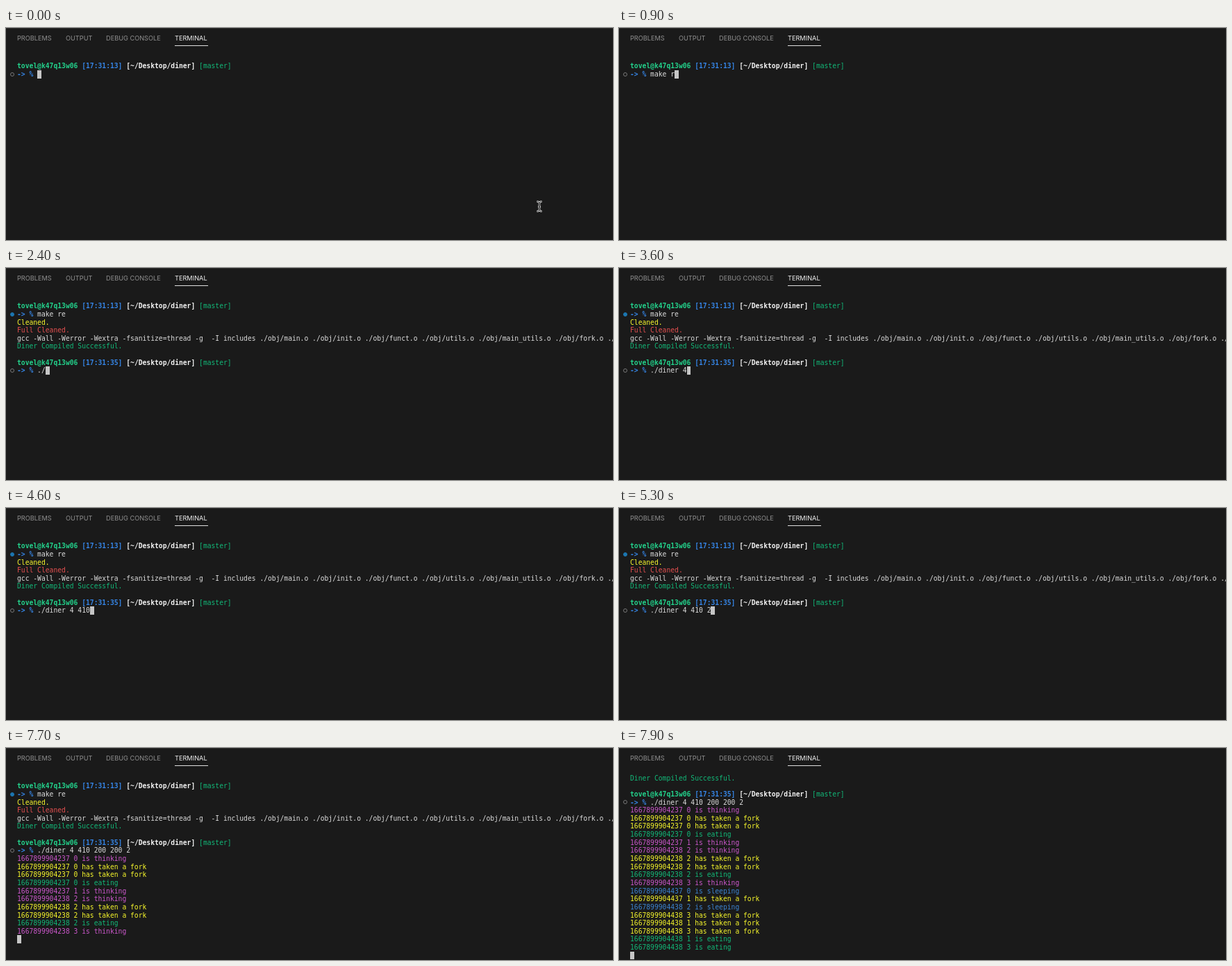
Recreate the animation shown at these times as an HTML page. Size 874 px wide and 306 px high, loop 8000 ms.

```html
<!DOCTYPE html>
<html lang="en">
<meta charset="utf-8">
<title>Terminal session</title>
<style>
  html, body { margin: 0; width: 100%; height: 100%; overflow: hidden; background: #1a1a1a; }
  body { position: relative; box-sizing: border-box; border-top: 1px solid #2b2b2b; }
  nav span { position: absolute; top: 8px; font: 9.2px/12px Inter, sans-serif; color: #8f8f8f; white-space: pre; }
  nav .active { color: #f0f0f0; }
  nav .active::after { content: ""; position: absolute; left: 0; top: 16px; width: 48px; height: 1px; background: #e0e0e0; }
  #screen { position: absolute; left: 0; top: 36.65px; width: 100%;
    font: 9.69px/11.65px "DejaVu Sans Mono", monospace; color: #dcdcdc; }
  #screen div { position: relative; height: 11.65px; padding-left: 16px; white-space: pre; }
  .mark::before { content: ""; position: absolute; left: 5.5px; top: 2.8px; width: 6px; height: 6px;
    box-sizing: border-box; border: 1px solid #777; border-radius: 50%; }
  .done::before { border-color: #1c76b0; background: #1c76b0; }
  .cursor { display: inline-block; vertical-align: top; width: 5.83px; height: 11.65px; background: #c6c6c6; }
  b { color: #f2f2f2; }
  .user { color: #23d18b; }
  .blue { color: #3584e4; }
  .green { color: #12b878; }
  .yellow { color: #f7f72c; }
  .red { color: #e65050; }
  .pink { color: #cb57cb; }
  .sky { color: #3c84d2; }
  #pointer { position: absolute; left: -5px; top: -9px; fill: none; }
</style>
<nav>
  <span style="left:16px">PROBLEMS</span>
  <span style="left:86px">OUTPUT</span>
  <span style="left:144px">DEBUG CONSOLE</span>
  <span style="left:243px" class="active">TERMINAL</span>
</nav>
<div id="screen"></div>
<svg id="pointer" width="10" height="17">
  <g id="beam">
    <path d="M1.5 1.5Q5 1.5 5 4V13Q5 15.5 1.5 15.5M8.5 1.5Q5 1.5 5 4V13Q5 15.5 8.5 15.5M3 9H7" stroke="#eee" stroke-width="2.6"/>
    <path d="M2 1.5Q5 1.5 5 4V13Q5 15.5 2 15.5M8 1.5Q5 1.5 5 4V13Q5 15.5 8 15.5M3.5 9H6.5" stroke="#222" stroke-width=".9"/>
  </g>
</svg>
<script>
const DURATION = 8000, ROWS = 23;
const screenEl = document.getElementById('screen');
const pointer = document.getElementById('pointer');

// Each key is [time, number of characters visible from then on].
const build = { text: 'make re', keys: Array.from({ length: 7 }, (_, i) => [400 + i * 100, i + 1]) };
const run = {
  text: './diner 4 410 200 200 2',
  keys: [[2400, 2], [2600, 3], [2800, 8], [3600, 9], [3900, 10], [4200, 11], [4300, 12], [4600, 13],
    [5000, 14], [5300, 15], [5400, 16], [5500, 17], [5600, 18], [5700, 20], [5800, 21], [6800, 22], [7300, 23]]
};
const typed = ({ text, keys }, t) =>
  text.slice(0, keys.reduce((n, [at, count]) => t >= at ? count : n, 0));

const paint = (cls, text) => `<span class="${cls}">${text}</span>`;
const row = (html, cls = '') => `<div class="${cls}">${html}</div>`;

const prompt = clock => row(`<b class="user">tovel@k47q13w06</b> <b class="blue">[${clock}]</b> ` +
  `<b>[~/Desktop/diner]</b> ${paint('green', '[master]')}`);
const command = (text, cls) => row(`<b class="blue">-&gt; %</b> ${text}`, cls);

const objects = ['main', 'init', 'funct', 'utils', 'main_utils', 'fork', 'time'].map(n => `./obj/${n}.o`).join(' ');
const actions = {
  t: ['pink', 'is thinking'], f: ['yellow', 'has taken a fork'],
  e: ['green', 'is eating'], s: ['sky', 'is sleeping']
};
// Entries: last three digits of the timestamp, seat, action.
const log = entries => entries.split(' ').map(entry => {
  const [cls, action] = actions[entry[4]];
  return row(paint(cls, `1667899904${entry.slice(0, 3)} ${entry[3]} ${action}`));
});
const firstMeal = log('2370t 2370f 2370f 2370e 2371t 2382t 2382f 2382f 2382e 2383t'.replace(/\b238/g, '238'));
const secondMeal = log('4370s 4371f 4382s 4383f 4381f 4383f 4381e 4383e');

function terminal(t) {
  const cursor = '<span class="cursor"></span>';
  const lines = [row(''), prompt('17:31:13')];
  const add = (at, ...rows) => { if (t >= at) lines.push(...rows); };

  add(0, command(typed(build, t) + (t < 1100 ? cursor : ''), t < 1700 ? 'mark' : 'mark done'));
  add(1200, row(paint('yellow', 'Cleaned.')), row(paint('red', 'Full Cleaned.')));
  add(1500, row(`gcc -Wall -Werror -Wextra -fsanitize=thread -g  -I includes ${objects}`),
    row(paint('green', 'Diner Compiled Successful.')));
  add(1600, row(''), prompt('17:31:35'), command(typed(run, t) + (t < 7500 ? cursor : ''), 'mark'));
  add(7700, ...firstMeal);
  add(7900, ...secondMeal);
  if (t >= 1100 && t < 1600 || t >= 7500) lines.push(row(cursor));
  return lines.slice(-ROWS).join('');
}

let shown = '';
function frame(now) {
  const t = now % DURATION;
  const html = terminal(t);
  if (html !== shown) screenEl.innerHTML = shown = html;
  pointer.style.display = t < 200 ? '' : 'none';
  pointer.style.transform = t < 100 ? 'translate(768px, 257px)' : 'translate(869px, 190px)';
  requestAnimationFrame(frame);
}
requestAnimationFrame(frame);
</script>
</html>
```
